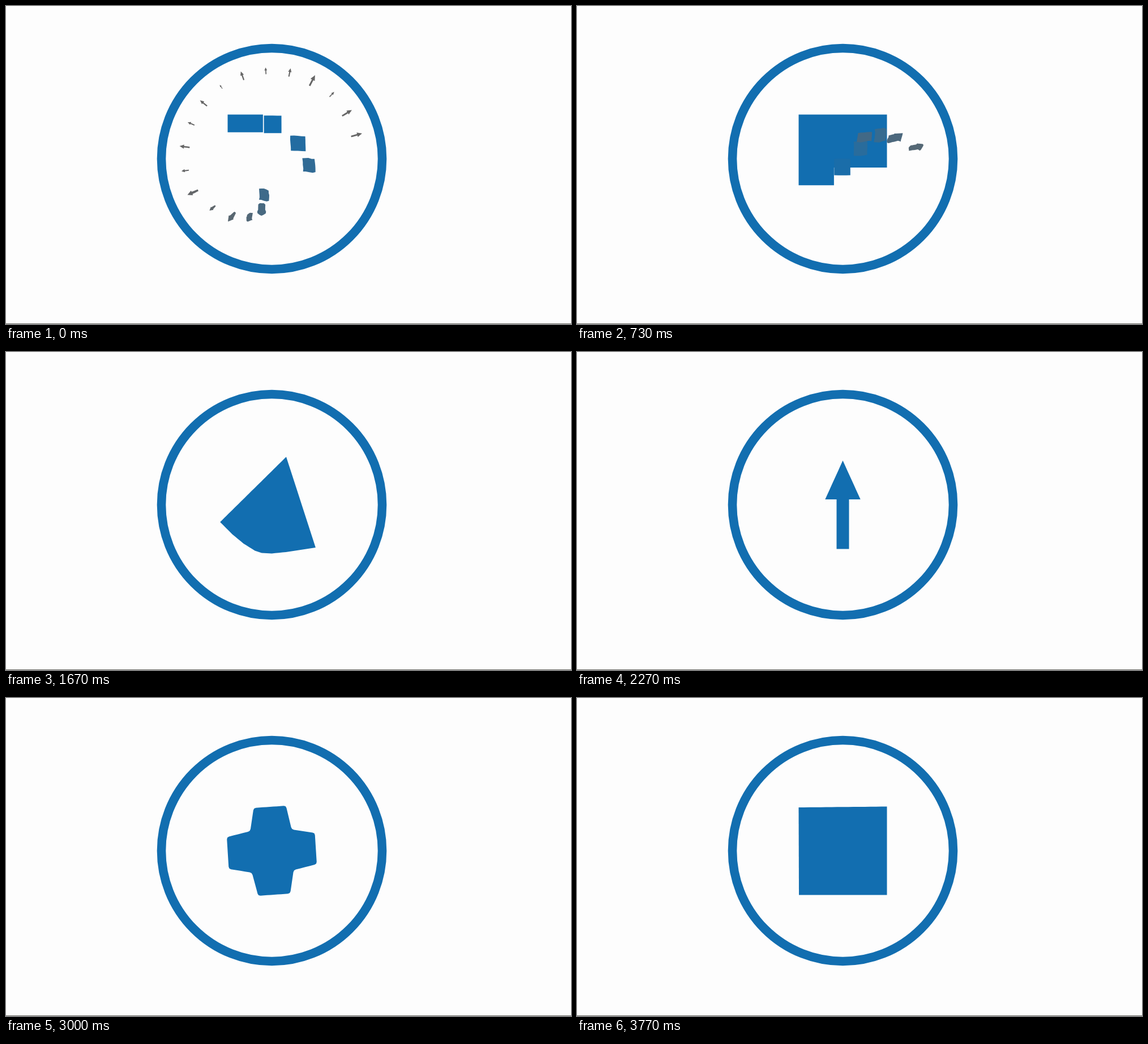
Recreate the animation shown at these times as an HTML page with a canvas. Size 998 px wide and 561 px high, loop 3810 ms.

```html
<!DOCTYPE html>
<html lang="en">
<head>
<meta charset="utf-8">
<title>Shape medley</title>
<style>
  html, body { margin: 0; width: 100%; height: 100%; overflow: hidden; background: #fdfdfd; }
  canvas { display: block; }
</style>
</head>
<body>
<canvas id="stage" width="998" height="561"></canvas>
<script>
const ctx = document.getElementById('stage').getContext('2d');
const LOOP = 3810, CX = 469.5, CY = 269.5, HALF = 78;
const BLUE = [18, 110, 176], GRAY = [102, 102, 102];
const lerp = (a, b, p) => a + (b - a) * p;
const mix = (a, b, p) => a.map((v, i) => lerp(v, b[i], p));
const rgb = c => `rgb(${c.map(Math.round)})`;
const dist = (a, b) => Math.hypot(a[0] - b[0], a[1] - b[1]);

// Ring interpolation: subdivide, equalise point counts, align, then blend.
function subdivide(ring, max = 10) {
  const out = ring.slice();
  for (let i = 0; i < out.length; i++) {
    let b = out[(i + 1) % out.length];
    while (dist(out[i], b) > max) {
      b = mix(out[i], b, 0.5);
      out.splice(i + 1, 0, b);
    }
  }
  return out;
}

function addPoints(ring, count) {
  if (count <= 0) return;
  const goal = ring.length + count;
  const length = ring.reduce((s, a, i) => s + dist(a, ring[(i + 1) % ring.length]), 0);
  const step = length / count;
  let i = 0, cursor = 0, next = step / 2;
  while (ring.length < goal) {
    const a = ring[i % ring.length], b = ring[(i + 1) % ring.length], seg = dist(a, b);
    if (next <= cursor + seg) {
      ring.splice(i + 1, 0, seg ? mix(a, b, (next - cursor) / seg) : a);
      next += step;
    } else {
      cursor += seg;
      i++;
    }
  }
}

function align(ring, other) {
  const n = ring.length;
  let best = 0, least = Infinity;
  for (let o = 0; o < n; o++) {
    let sum = 0;
    for (let i = 0; i < n; i++) sum += dist(ring[(i + o) % n], other[i]) ** 2;
    if (sum < least) { least = sum; best = o; }
  }
  return ring.slice(best).concat(ring.slice(0, best));
}

function morph(from, to) {
  let a = subdivide(from);
  const b = subdivide(to), gap = a.length - b.length;
  addPoints(a, -gap);
  addPoints(b, gap);
  a = align(a, b);
  return p => a.map((pt, i) => mix(pt, b[i], p));
}

function roundCorners(ring, r) {
  return ring.flatMap((c, i) => {
    const toward = q => mix(c, q, r / dist(c, q));
    const a = toward(ring[(i + ring.length - 1) % ring.length]);
    const b = toward(ring[(i + 1) % ring.length]);
    return [a, mix(mix(a, b, 0.5), c, 0.5), b];
  });
}

const rect = (x, y, w, h) => [
  [x - w / 2, y - h / 2], [x + w / 2, y - h / 2],
  [x + w / 2, y + h / 2], [x - w / 2, y + h / 2]];
const square = rect(0, 0, 2 * HALF, 2 * HALF);
const arrow = [[0, -78], [31.2, -9.5], [11, -9.5], [11, 78], [-11, 78], [-11, -9.5], [-31.2, -9.5]];
const plus = roundCorners([
  [-28, -78], [28, -78], [28, -28], [78, -28], [78, 28], [28, 28],
  [28, 78], [-28, 78], [-28, 28], [-78, 28], [-78, -28], [-28, -28]], 4);
const twistedPlus = roundCorners([
  [-32, -75.5], [25, -79.5], [35, -37.5], [76, -31.5], [79.5, 23.5], [38.5, 34],
  [32.5, 75.5], [-24, 79.5], [-35, 38.5], [-76, 32], [-79.5, -24], [-38, -34.5]], 4);
const wedge = [[25.5, -84.5], [77.5, 75.5], [25, 83.5], [0, 86], [-18, 85],
  [-30, 81], [-50, 68.5], [-70, 52], [-91.5, 30.5]];
const tilted = [[-78, -76.5], [78, -78], [78, 78], [-77.5, 78]];

// Pieces fly from a ring of arrows to cells: four rows of five, one row of three.
const COUNT = 23, FLIGHT = 500, STAGGER = 50, HEAD_START = 596;
const lengths = [16, 14, 18, 17, 19, 15, 17, 11, 17, 11, 20, 13, 18, 13, 16, 8, 16, 12, 15, 21, 12, 20, 20];
const pieces = lengths.map((length, k) => {
  const angle = k / COUNT * 2 * Math.PI, turn = angle + Math.PI / 2, s = length / 156;
  const x0 = 155.5 * Math.cos(angle), y0 = 155.5 * Math.sin(angle);
  const start = arrow.map(([x, y]) => [
    x0 + s * (x * Math.cos(turn) - y * Math.sin(turn)),
    y0 + s * (x * Math.sin(turn) + y * Math.cos(turn))]);
  const row = Math.floor(k / 5), w = 2 * HALF / (row < 4 ? 5 : 3), h = 2 * HALF / 5;
  const cell = rect(-HALF + (k % 5 + 0.5) * w, -HALF + (row + 0.5) * h, w, h);
  return { cell, at: morph(start, cell) };
});

const ASSEMBLED = 1004, FADED = 1504;
const keys = [
  [FADED, square], [1670, wedge], [2235, arrow], [2300, arrow], [2775, plus],
  [3000, twistedPlus], [3450, square], [3660, square], [3770, tilted], [LOOP, tilted]];
const steps = keys.slice(1).map(([end, shape], i) => ({
  start: keys[i][0], end, at: morph(keys[i][1], shape) }));

function fill(rings, color) {
  ctx.beginPath();
  for (const ring of rings) {
    ring.forEach(([x, y], i) => i ? ctx.lineTo(x, y) : ctx.moveTo(x, y));
    ctx.closePath();
  }
  ctx.fillStyle = rgb(color);
  ctx.fill();
}

function drawPieces(t) {
  const progress = k => Math.min(1, Math.max(0, (t + HEAD_START - STAGGER * k) / FLIGHT)) ** 2;
  fill(pieces.filter((_, k) => progress(k) === 1).map(p => p.cell), BLUE);
  pieces.forEach((piece, k) => {
    const p = progress(k);
    if (p < 1) fill([piece.at(p)], mix(GRAY, BLUE, p));
  });
}

function draw(t) {
  ctx.setTransform(1, 0, 0, 1, 0, 0);
  ctx.fillStyle = '#fdfdfd';
  ctx.fillRect(0, 0, 998, 561);
  ctx.fillStyle = '#666660';
  ctx.fillRect(0, 560, 998, 1);
  ctx.translate(CX, CY);
  ctx.beginPath();
  ctx.arc(0, 0, 195, 0, 2 * Math.PI);
  ctx.lineWidth = 15.6;
  ctx.strokeStyle = rgb(BLUE);
  ctx.stroke();

  if (t < ASSEMBLED) {
    drawPieces(t);
  } else if (t < FADED) {
    ctx.globalAlpha = (FADED - t) / (FADED - ASSEMBLED);
    fill([square], BLUE);
    ctx.globalAlpha = 1;
  } else {
    const step = steps.find(s => t < s.end);
    fill([step.at((t - step.start) / (step.end - step.start))], BLUE);
  }
}

function tick() {
  draw(performance.now() % LOOP);
  requestAnimationFrame(tick);
}
tick();
</script>
</body>
</html>
```
